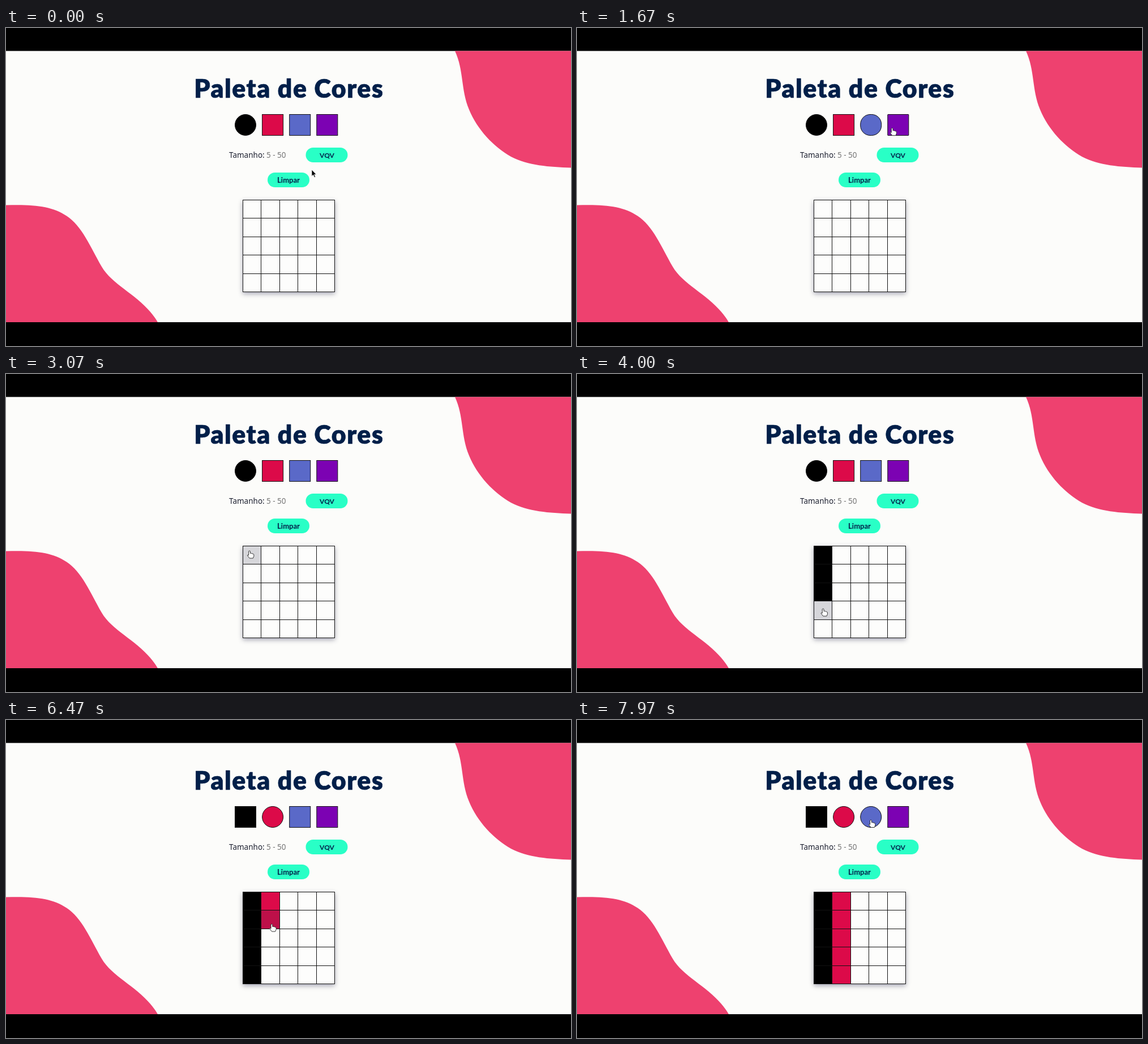
Animation, 998 px wide and 561 px high, one loop 8 s. Source, as an HTML page:

```html
<!DOCTYPE html>
<html lang="pt">
<head>
<meta charset="utf-8">
<title>Paleta de Cores</title>
<style>
  html, body { margin: 0; width: 100%; height: 100%; overflow: hidden; background: #000; }
  svg { display: block; width: 100vw; height: 100vh; }
  text { text-anchor: middle; fill: #001f49; font-family: Lato, "Open Sans", sans-serif; font-weight: 700; }
  .title { font-size: 44.5px; font-weight: 900; letter-spacing: 1.6px; stroke: #001f49; stroke-width: .7; stroke-linejoin: round; }
  .field { font: 400 13.5px "Noto Sans", "Open Sans", sans-serif; fill: #1c2030; text-anchor: start; }
  .hint { fill: #757575; }
  .blob { fill: #ee416f; }
  .button { fill: #29ffc6; }
  .ink { stroke: #111; stroke-width: 1; }
  #board { filter: drop-shadow(0 3px 4.5px rgba(20, 20, 60, .38)); }
  #board .ink { shape-rendering: crispEdges; }
</style>
</head>
<body>
<svg viewBox="0 0 998 561" preserveAspectRatio="none">
  <rect width="998" height="561" fill="#000"/>
  <rect y="40.5" width="998" height="478.500" fill="#fcfcfa"/>
  <path class="blob" d="M793 40.5C809 75 803 108 818 144C833 180 861 209 892 227C922 243 960 245 998 246.500V40.500Z"/>
  <path class="blob" d="M0 312.500C48 311 82 314 107 331.500C134 349 149 386 169 421C190 457 241 473 268 519H0Z"/>
  <text class="title" x="499.800" y="122.500">Paleta de Cores</text>
  <g id="swatches"></g>
  <text class="field" x="394" y="229">Tamanho:</text>
  <text class="field hint" x="460" y="229">5 - 50</text>
  <rect class="button" x="529.500" y="211" width="74" height="26" rx="13"/>
  <text x="567" y="229" font-size="12">VQV</text>
  <rect class="button" x="462" y="255" width="74" height="26" rx="13"/>
  <text x="499" y="273" font-size="13">Limpar</text>
  <g id="board"></g>
  <g id="cursor">
    <path id="arrow" fill="#000" stroke="#fff" stroke-width=".7" d="M0 0V11.500L2.700 9L4.700 13.500L6.500 12.700L4.600 8.400H8Z"/>
    <path id="hand" fill="#fff" stroke="#222" stroke-width=".9" stroke-linejoin="round"
      d="M-1.400 1.200Q0 -.6 1.400 1.200V4.800Q3 4.200 3.700 5.200Q5.200 4.700 5.800 5.800Q7.500 5.700 7.800 7.200V10L6.300 13.500H.2L-3.700 8.600Q-3.500 6.800 -1.400 8.400Z"/>
  </g>
</svg>
<script>
const LOOP = 8000, EASE_MS = 200, CELL = 32.4, GRID = 5, RED_PICKED = 5480;
const colors = ['#000000', '#dc0a49', '#5a69c8', '#7c02b3'];

// Pointer rests, with an eased move between each pair
const rests = [
  { from: 0, to: 200, x: 540, y: 250 },
  { from: 700, to: 1000, x: 470, y: 176 },
  { from: 1350, to: 1620, x: 520, y: 179 },
  { from: 1680, to: 2100, x: 559, y: 176 },
  { from: 2850, to: 3070, x: 430, y: 311.5 },
  { from: 4420, to: 4500, x: 436, y: 444 },
  { from: 5050, to: 5550, x: 466, y: 168 },
  { from: 5990, to: 5990, x: 470, y: 319 },
  { from: 7270, to: 7300, x: 468, y: 447 },
  { from: 7700, to: LOOP, x: 519, y: 176 }
];
// Painted columns: first click, then one row per step
const strokes = [{ start: 3150, step: 315 }, { start: 6110, step: 285 }];

const $ = id => document.getElementById(id);
const smooth = p => p * p * (3 - 2 * p);
const inside = (p, b) => p.x >= b.x && p.x < b.x + b.w && p.y >= b.y && p.y < b.y + b.h;

function addSquare(parent, x, y, size) {
  const el = document.createElementNS('http://www.w3.org/2000/svg', 'rect');
  const attrs = { x, y, width: size, height: size, class: 'ink' };
  for (const k in attrs) el.setAttribute(k, attrs[k]);
  parent.append(el);
  return { el, x, y, w: size, h: size };
}

const swatches = colors.map((color, i) => {
  const s = addSquare($('swatches'), 404.5 + 48.1 * i, 152.5, 37);
  s.el.setAttribute('fill', color);
  return s;
});
const cells = Array.from({ length: GRID * GRID }, (_, i) => {
  const col = i % GRID, row = Math.floor(i / GRID);
  return { col, row, ...addSquare($('board'), 418.5 + col * CELL, 303.5 + row * CELL, CELL) };
});
const buttons = [...document.querySelectorAll('.button')].map(b => b.getBBox())
  .map(({ x, y, width: w, height: h }) => ({ x, y, w, h }));
const clickable = [...swatches, ...cells, ...buttons];

function pointer(t) {
  const i = rests.findIndex(r => r.to >= t);
  const b = rests[i], a = rests[i - 1];
  if (!a || t >= b.from) return b;
  const k = smooth((t - a.to) / (b.from - a.to));
  return { x: a.x + (b.x - a.x) * k, y: a.y + (b.y - a.y) * k };
}

// Corner rounding follows how long the swatch was active within the transition window
function roundness(i, t) {
  const steps = 20;
  let active = 0;
  for (let n = 0; n < steps; n++) {
    const at = t - n * EASE_MS / steps;
    const picked = at < RED_PICKED ? 0 : 1;
    if (i === picked || inside(pointer(at), swatches[i])) active++;
  }
  return smooth(active / steps);
}

function cellColor({ col, row }, t, hovered) {
  const stroke = strokes[col];
  const painted = stroke && t >= stroke.start + row * stroke.step;
  if (!painted) return hovered ? '#d6d6da' : '#fdfdfc';
  return hovered && col ? '#bd1049' : colors[col];
}

function draw(t) {
  const at = pointer(t);
  swatches.forEach((s, i) => s.el.setAttribute('rx', roundness(i, t) * s.w / 2));
  cells.forEach(c => c.el.setAttribute('fill', cellColor(c, t, inside(at, c))));
  const hand = clickable.some(b => inside(at, b));
  $('hand').style.display = hand ? '' : 'none';
  $('arrow').style.display = hand ? 'none' : '';
  $('cursor').setAttribute('transform', `translate(${at.x} ${at.y})`);
}

const start = performance.now();
function frame() {
  draw((performance.now() - start) % LOOP);
  requestAnimationFrame(frame);
}
frame();
</script>
</body>
</html>
```
